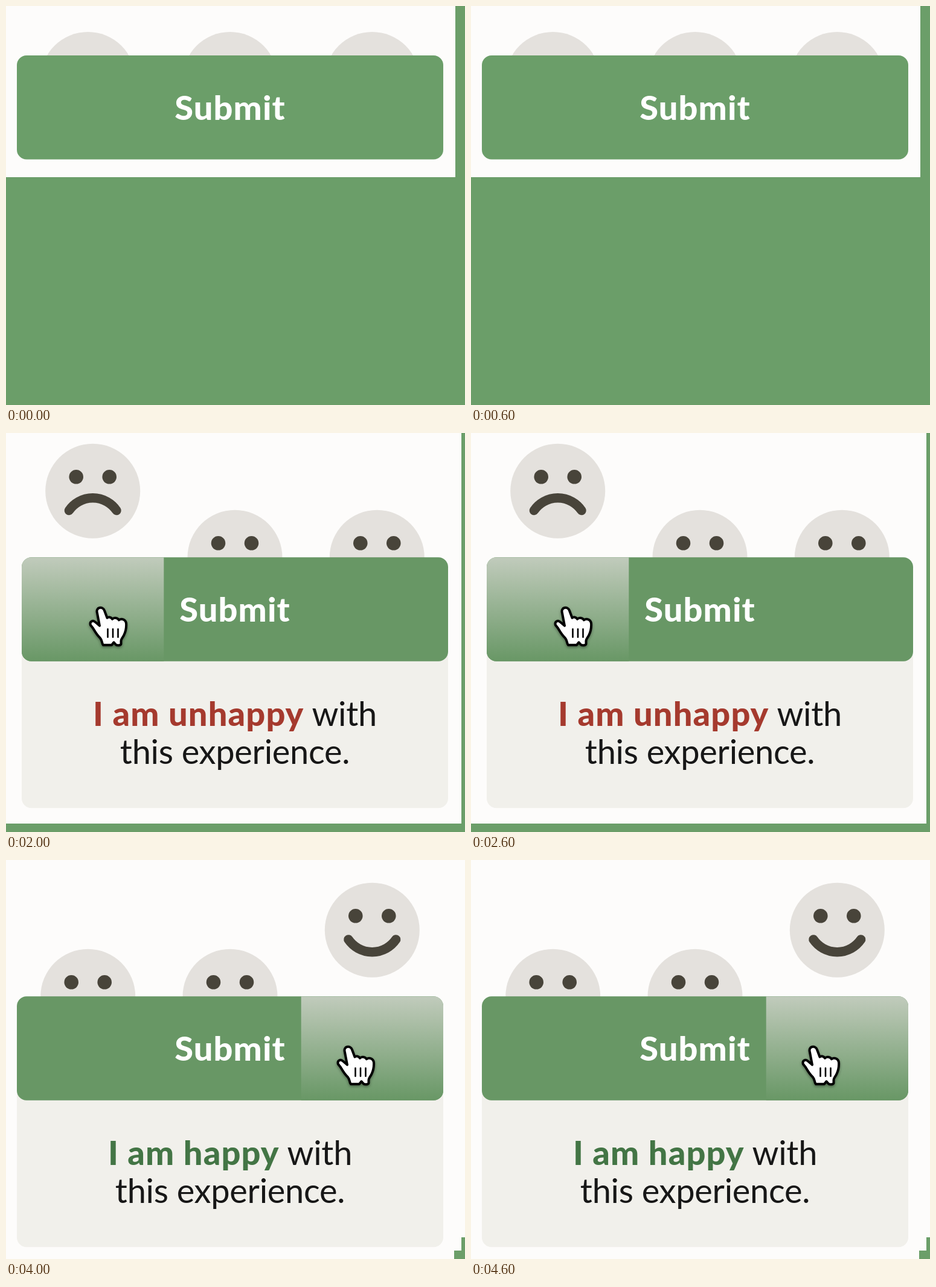
Animation, 760 px wide and 662 px high, one loop 5000 ms. Source, as an HTML page:

```html
<!DOCTYPE html>
<html lang="en">
<head>
<meta charset="utf-8">
<title>Feedback button</title>
<style>
  html, body { margin: 0; width: 100%; height: 100%; overflow: hidden; background: #6b9e69; }
  svg { display: block; width: 760px; height: 662px; }

  .scene {
    visibility: hidden;
    animation: show 5s step-end calc(var(--i) * 1s - 5s) infinite;
  }
  @keyframes show {
    0% { visibility: visible; }
    20%, 100% { visibility: hidden; }
  }

  .paper { fill: #fdfcfb; }
  .panel { fill: #f1f0eb; }
  .button { fill: #6b9e69; }
  .button.hover { fill: #689765; }
  .skin { fill: #e4e1dd; }
  .eye { fill: #48443a; }
  .mouth { fill: none; stroke: #48443a; stroke-width: 15.5; stroke-linecap: round; }
  .mark { fill: #e85a44; }

  text { font: 400 56px Lato, "Open Sans", sans-serif; fill: #171717; text-anchor: middle; letter-spacing: -.3px; }
  .strong, .label { font-weight: 800; letter-spacing: 1.1px; }
  .label { fill: #fff; }
  .hint { font-style: italic; fill: #6e6d6a; text-anchor: start; letter-spacing: 1.1px; }
  .bad { fill: #a53a2e; }
  .good { fill: #437545; }

  .hand { fill: #fff; stroke: #000; stroke-width: 4; stroke-linejoin: round; }
  .folds { stroke: #000; stroke-width: 2.6; stroke-linecap: round; }
  #cursor { filter: drop-shadow(0 2px 2px rgba(0, 0, 0, .4)); }
</style>
</head>
<body>
<svg viewBox="0 0 760 662">
  <defs>
    <linearGradient id="glow" x2="0" y2="1">
      <stop offset="0" stop-color="#c1cbbc"/>
      <stop offset="1" stop-color="#689765"/>
    </linearGradient>
    <clipPath id="round"><rect width="706" height="172.5" rx="16"/></clipPath>

    <g id="head">
      <circle class="skin" r="78.5"/>
      <circle class="eye" cx="-27.5" cy="-23.5" r="11.8"/>
      <circle class="eye" cx="27.5" cy="-23.5" r="11.8"/>
    </g>
    <g id="sad">
      <use href="#head"/>
      <path class="mouth" d="M-39.3 32.2A47.6 47.6 0 0 1 39.3 32.2"/>
    </g>
    <g id="flat">
      <use href="#head"/>
      <path class="mouth" d="M-39.3 23.4H39.3"/>
    </g>
    <g id="glad">
      <use href="#head"/>
      <path class="mouth" d="M-39.3 15.6A47.6 47.6 0 0 0 39.3 15.6"/>
    </g>

    <rect id="panel" class="panel" y="150" width="706" height="266" rx="16"/>
    <rect id="plain" class="button" width="706" height="172.5" rx="16"/>
    <rect id="active" class="button hover" width="706" height="172.5" rx="16"/>
    <text id="label" class="label" x="353" y="106.5">Submit</text>
    <text id="ending" x="353" y="343">this experience.</text>

    <g id="cursor">
      <path class="hand" d="M14 11C11 1 23 -1 26 7L30.500 19C33 17 37 17.500 39 21C42 18 48 18.500 50 22.500C54 19.500 61 21 62 28C62.500 35 61 42 58 48C56 52 53.500 54 53.500 57V62C53 65 46 65 44.500 63L41.500 59.500L38 64H24C21 61 23 57 19 52.500C13 47 10 41 7 36L3 31C1 25 7 22 11 26L18 32Z"/>
      <path class="folds" d="M31.500 37.500V51M40 37.500V51M48.500 37.500V51"/>
    </g>
  </defs>

  <g class="scene" style="--i:0">
    <path class="paper" d="M0 0H744V284H0Z"/>
    <g transform="translate(18 82)">
      <use href="#sad" x="117.700" y="39.500"/>
      <use href="#flat" x="353" y="39.500"/>
      <use href="#glad" x="588.300" y="39.500"/>
      <use href="#plain"/>
      <use href="#label"/>
    </g>
  </g>

  <g class="scene" style="--i:1">
    <path class="paper" d="M0 0H744V284H738V646H0Z"/>
    <g transform="translate(14 217.300)">
      <use href="#sad" x="117.700" y="-110"/>
      <use href="#flat" x="353" y="-110"/>
      <use href="#glad" x="588.300" y="-110"/>
      <rect class="panel" y="150" width="706" height="258" rx="16"/>
      <use href="#plain"/>
      <use href="#label"/>
      <circle class="mark" cx="114" cy="290.300" r="31.500"/>
      <text class="hint" x="235.500" y="279.500">Give us feedback</text>
      <text class="hint" x="235.500" y="342.500">as you submit.</text>
    </g>
  </g>

  <g class="scene" style="--i:2">
    <path class="paper" d="M0 0H754V648H0Z"/>
    <g transform="translate(26 206.300)">
      <use href="#sad" x="117.700" y="-110"/>
      <use href="#flat" x="353"/>
      <use href="#glad" x="588.300"/>
      <use href="#panel"/>
      <use href="#active"/>
      <rect width="235.300" height="172.500" fill="url(#glow)" clip-path="url(#round)"/>
      <use href="#label"/>
      <text x="353" y="280"><tspan class="strong bad">I am unhappy</tspan> with</text>
      <use href="#ending"/>
      <use href="#cursor" x="111" y="81.500"/>
    </g>
  </g>

  <g class="scene" style="--i:3">
    <path class="paper" d="M0 0H760V626H754V648H0Z"/>
    <g transform="translate(30 193.300)">
      <use href="#sad" x="117.700"/>
      <use href="#flat" x="353" y="-110"/>
      <use href="#glad" x="588.300"/>
      <use href="#panel"/>
      <use href="#active"/>
      <rect x="227.500" width="251" height="172.500" fill="url(#glow)"/>
      <use href="#label"/>
      <text x="353" y="280"><tspan class="strong">I am okay</tspan> with</text>
      <use href="#ending"/>
      <use href="#cursor" x="325.500" y="81.500"/>
    </g>
  </g>

  <g class="scene" style="--i:4">
    <path class="paper" d="M0 0H760V626H754V648H742V662H0Z"/>
    <g transform="translate(18 226.300)">
      <use href="#sad" x="117.700"/>
      <use href="#flat" x="353"/>
      <use href="#glad" x="588.300" y="-110"/>
      <use href="#panel"/>
      <use href="#active"/>
      <rect x="470.700" width="235.300" height="172.500" fill="url(#glow)" clip-path="url(#round)"/>
      <use href="#label"/>
      <text x="353" y="280"><tspan class="strong good">I am happy</tspan> with</text>
      <use href="#ending"/>
      <use href="#cursor" x="529" y="81.500"/>
    </g>
  </g>
</svg>
</body>
</html>
```
